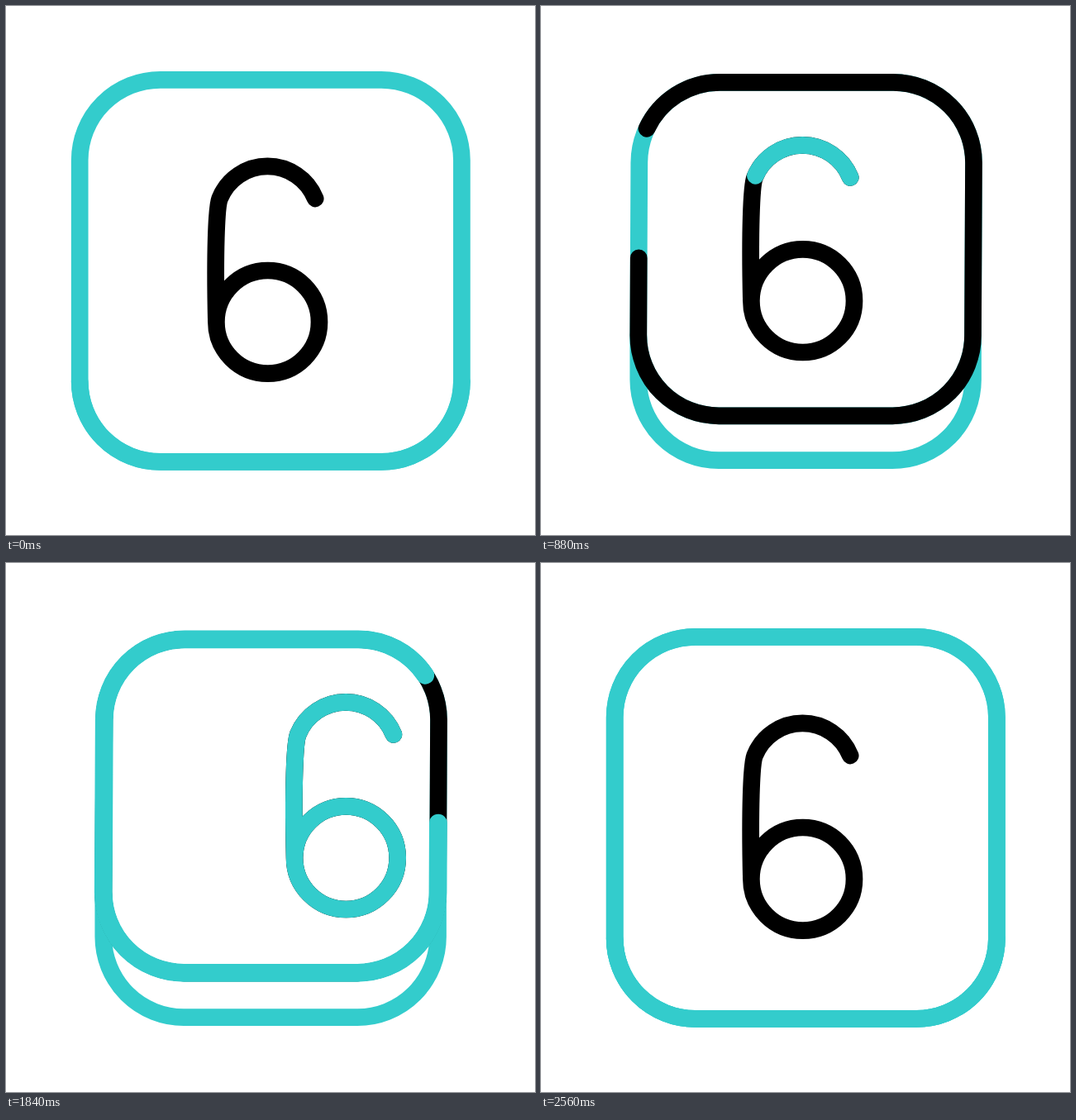
Recreate the animation shown at these times as an HTML page. Size 640 by 640 pixels, loop 2.8 s.

```html
<!DOCTYPE html>
<html lang="en">
<head>
<meta charset="utf-8">
<title>Key press</title>
<style>
  html, body { margin: 0; width: 100%; height: 100%; overflow: hidden; background: #fff; }
  svg { display: block; width: 100%; height: 100%; }
  path { fill: none; stroke-width: 20.7; stroke-linecap: round; stroke-linejoin: round; }
  .ink { stroke: #000; }
  .aqua { stroke: #33cccc; }
</style>
</head>
<body>
<svg viewBox="0 0 640 640">
  <clipPath id="tileClip"><path id="clipShape"/></clipPath>
  <path id="back" class="aqua" stroke-linecap="butt"/>
  <g clip-path="url(#tileClip)">
    <g id="digit">
      <path id="digitInk" class="ink"/>
      <path id="digitAqua" class="aqua" pathLength="1"/>
    </g>
  </g>
  <path id="tile" class="aqua"/>
  <path id="tileInk" class="ink" pathLength="1"/>
  <path id="tileAqua" class="aqua" pathLength="1"/>
</svg>
<script>
const LOOP = 2800, STEP = 40, SWAP = 1960;
const el = id => document.getElementById(id);
const clamp = v => Math.min(1, Math.max(0, v));
const mix = (a, b, k) => a + (b - a) * k;

// Eased progress; the curve is cubic-bezier(a, 0, b, 1).
function ease(t, start, span, a, b) {
  const x = clamp((t - start) / span);
  if (x === 0 || x === 1) return x;
  let lo = 0, hi = 1;
  for (let i = 0; i < 30; i++) {
    const s = (lo + hi) / 2, r = 1 - s;
    if (3 * a * s * r * r + 3 * b * s * s * r + s * s * s < x) lo = s;
    else hi = s;
  }
  return lo * lo * (3 - 2 * lo);
}

// Shows a stretch of a path whose length counts as 1.
function trim(path, from, len) {
  path.style.display = len > 0 ? "" : "none";
  if (len >= 1) {
    path.style.strokeDasharray = "none";
    return;
  }
  path.style.strokeDasharray = len + " " + (1 - len);
  path.style.strokeDashoffset = -(((from % 1) + 1) % 1);
}

const SIX = "M374.2 233A62.3 62.3 0 0 0 258.6 233C254.5 243 252.5 300 254.4 382.3" +
  "A62.3 62.3 0 0 0 379 382.3A62.3 62.3 0 0 0 254.4 382.3";
el("digitInk").setAttribute("d", SIX);
el("digitAqua").setAttribute("d", SIX);

function drawBox(press) {
  const left = mix(89.2, 118.3, press), right = mix(551.4, 523, press);
  const top = mix(89.3, 92.3, press), bottom = mix(551.4, 495.8, press);
  const floor = mix(551.4, 549.6, press), r = 97.3, k = 0.5 * press;
  const arc = (x, y) => `A${r} ${r} 0 0 1 ${x} ${y}`;
  const shape = `M${left + k + r} ${top}L${right + k - r} ${top}` +
    arc(right + k, top + r) + `L${right - k} ${bottom - r}` +
    arc(right - k - r, bottom) + `L${left - k + r} ${bottom}` +
    arc(left - k, bottom - r) + `L${left + k} ${top + r}` +
    arc(left + k + r, top) + "Z";
  for (const id of ["tile", "tileInk", "tileAqua", "clipShape"])
    el(id).setAttribute("d", shape);
  el("back").setAttribute("d", `M${right - k} ${bottom - r}V${floor - r}` +
    arc(right - k - r, floor) + `H${left - k + r}` +
    arc(left - k, floor - r) + `V${bottom - r}`);
}

function slide(t) {
  if (t < SWAP) return 290 * clamp((t - 1680) / 280) ** 2;
  return -290 * clamp((2260 - t) / 300) ** 2.5;
}

function draw(t) {
  const down = ease(t, 80, 725, 0.53, 0.2);
  const up = ease(t, 1905, 620, 0.53, 0.2);
  const press = down - up;
  drawBox(press);

  trim(el("tileInk"), 0.83 + (t - 560) * 2.94e-4,
    t < 2400 ? ease(t, 95, 1240, 0.53, 0.2) : 0);
  trim(el("tileAqua"), 0.1526 + (t - 1480) * 5.114e-4, ease(t, 1080, 1240, 0.53, 0.2));
  el("tileAqua").style.strokeWidth = mix(20.7, 21.8, press);

  const fresh = t >= SWAP;
  trim(el("digitAqua"), 0, fresh ? 0 : ease(t, 454, 1241, 0.594, 0.3));
  el("digit").setAttribute("transform",
    `translate(${slide(t)} ${fresh ? 0 : -25.6 * down})`);
}

const began = performance.now();
function tick() {
  const t = (performance.now() - began) % LOOP;
  draw(Math.floor(t / STEP) * STEP);
  requestAnimationFrame(tick);
}
tick();
</script>
</body>
</html>
```
